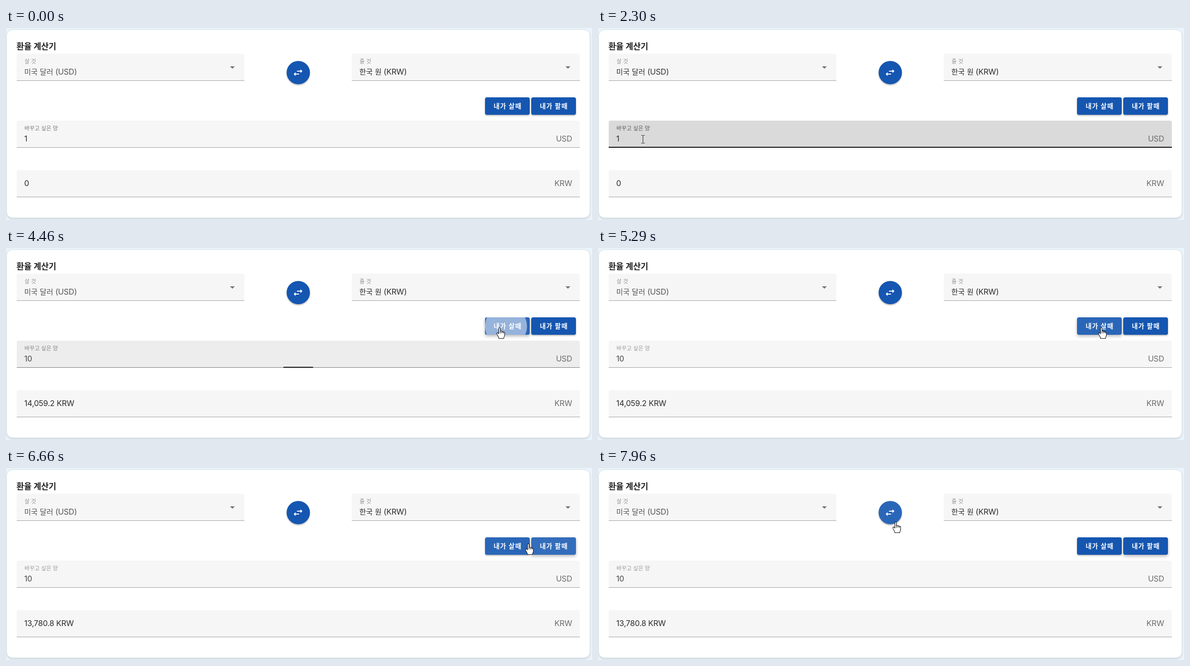
An HTML page with a canvas for the animation above (8 s loop, 1205 px wide and 396 px high).

```html
<!DOCTYPE html>
<html lang="ko">
<head>
<meta charset="utf-8">
<title>환율 계산기</title>
<style>
  html, body { margin: 0; width: 100%; height: 100%; overflow: hidden; background: #eaf4fa; }
  canvas { display: block; }
</style>
</head>
<body>
<canvas id="stage" width="1205" height="396"></canvas>
<script>
const ctx = document.getElementById('stage').getContext('2d');
const LOOP = 8000;
const BLUE = '#1556b1', BLUE_HOVER = '#2a66b8';
const FOCUS_AT = 1720, TYPE_AT = 2630;

// Bursts of screen updates: start, end, number of steps.
const BURSTS = [
  [730, 1470, 12], [1670, 2100, 7], [2300, 2420, 2], [2630, 2630, 1],
  [3160, 3930, 11], [3990, 4740, 11], [4880, 4950, 2], [5220, 5850, 10],
  [6310, 7070, 12], [7140, 7890, 12], [7960, 7960, 1]
];

// Pointer way: time, x, y.
const WAY = [
  [680, 121, 396], [730, 117, 376], [930, 72, 296], [1130, 68, 256], [1470, 76, 209],
  [1670, 78, 212], [1960, 92, 229], [3090, 92, 229], [3400, 434, 178], [3600, 760, 142],
  [3720, 900, 131], [3930, 998, 161], [4300, 1015, 164], [5160, 1015, 164],
  [5500, 1068, 165], [5850, 1126, 156], [6540, 1126, 156], [6800, 1010, 156],
  [7070, 888.5, 154], [7140, 880, 153], [7500, 720, 134], [7890, 612, 111], [8000, 612, 111]
];

const BUTTONS = [
  { x: 985, label: '내가 살때', down: 4332, px: 1015, py: 164 },
  { x: 1080, label: '내가 팔때', down: 6265, px: 1125, py: 157 }
];

const SWAP = new Path2D('M21,9L17,5V8H10V10H17V13M7,11L3,15L7,19V16H14V14H7V11Z');
const ARROW = new Path2D('M.5,.5V16.3L4,13L6.6,18.6L9,17.6L6.5,12.1H11.3Z');
const HAND = new Path2D('M-1.6,13V1.8C-1.6,-.2 1.5,-.2 1.5,1.8V8C2.2,6.8 4.5,7 4.7,8.8' +
  'C5.5,7.7 7.6,8 7.8,9.8C8.9,8.8 10.4,9.6 10.4,11.2V15.5C10.4,18 8.6,19 8.6,22.5' +
  'H-1.6C-1.6,19.5 -4,17 -5.6,13.4C-6.4,11.2 -4.2,9.8 -2.9,11.4Z');
const KNUCKLES = new Path2D('M1.5,8V12M4.7,9V12M7.8,10V12');

const clamp = v => Math.max(0, Math.min(1, v));
const mix = (a, b, p) => a + (b - a) * p;
const gray = v => { v = Math.round(v); return `rgb(${v},${v},${v})`; };

// cubic-bezier(.4, 0, .2, 1)
function ease(v) {
  v = clamp(v);
  let lo = 0, hi = 1;
  for (let i = 0; i < 20; i++) {
    const s = (lo + hi) / 2, r = 1 - s;
    if (1.2 * r * r * s + 0.6 * r * s * s + s * s * s < v) lo = s; else hi = s;
  }
  return lo * lo * (3 - 2 * lo);
}

function snap(t) {
  let held = 0;
  for (const [start, end, n] of BURSTS) {
    if (t < start) break;
    const step = n > 1 ? (end - start) / (n - 1) : 0;
    held = start + (n > 1 ? Math.min(n - 1, Math.floor((t - start) / step + 1e-6)) * step : 0);
  }
  return held;
}

function pointer(t) {
  const i = WAY.findIndex(p => p[0] > t);
  if (i < 1) return { x: -99, y: -99 };
  const [t0, x0, y0] = WAY[i - 1], [t1, x1, y1] = WAY[i];
  const p = (t - t0) / (t1 - t0);
  return { x: mix(x0, x1, p), y: mix(y0, y1, p) };
}

const inside = (p, x, y, w, h) => p.x >= x && p.x < x + w && p.y >= y && p.y < y + h;

// Hangul and Latin runs use different faces, so each run is set on its own.
function write(str, x, y, size, color, { weight = 400, track = 0, align = 0 } = {}) {
  const runs = str.match(/[가-힣]+|[^가-힣]+/g).map(s => {
    const hangul = /[가-힣]/.test(s);
    const font = hangul
      ? `${weight} ${size * 0.94}px "Noto Sans CJK KR", "Noto Sans CJK", sans-serif`
      : `${weight} ${size}px Inter, sans-serif`;
    const space = (hangul ? track : track - 0.2) + 'px';
    ctx.font = font;
    ctx.letterSpacing = space;
    return { s, font, space, w: ctx.measureText(s).width };
  });
  x -= align * (runs.reduce((sum, r) => sum + r.w, 0) - track);
  ctx.fillStyle = color;
  for (const r of runs) {
    ctx.font = r.font;
    ctx.letterSpacing = r.space;
    ctx.fillText(r.s, x, y);
    x += r.w;
  }
}

function box(x, y, w, h, r) {
  ctx.beginPath();
  ctx.roundRect(x, y, w, h, r);
}

function circle(x, y, r) {
  ctx.beginPath();
  ctx.arc(x, y, r, 0, 2 * Math.PI);
}

// Fills the current path with a drop shadow below it.
function raise(color, lift) {
  ctx.save();
  ctx.fillStyle = color;
  ctx.shadowColor = 'rgba(0,0,0,.28)';
  ctx.shadowOffsetY = mix(2, 3, lift);
  ctx.shadowBlur = mix(3, 6, lift);
  ctx.fill();
  ctx.restore();
}

function field(x, y, w, bg = 246, line = 160) {
  box(x, y, w, 56, [4, 4, 0, 0]);
  ctx.fillStyle = gray(bg);
  ctx.fill();
  ctx.fillStyle = gray(line);
  ctx.fillRect(x, y + 55, w, 1);
}

function select(x, w, label, value, color) {
  field(x, 53, w);
  write(label, x + 16, 73, 12, '#929292');
  write(value, x + 15.5, 96, 16, color);
  const cx = x + w - 24.5;
  ctx.beginPath();
  ctx.moveTo(cx - 5, 79);
  ctx.lineTo(cx + 5, 79);
  ctx.lineTo(cx, 84);
  ctx.fillStyle = '#757575';
  ctx.fill();
}

function button(b, t, mouse) {
  const { x, label, down, px, py } = b, y = 143, w = 92, h = 36;
  const other = BUTTONS.find(o => o !== b);
  const active = t >= down && !(other.down > down && t >= other.down + 120);
  const age = t - down;
  box(x, y, w, h, 4);
  raise(inside(mouse, x, y, w, h) ? BLUE_HOVER : BLUE, active ? ease(age / 100) : 0);
  if (age > 0 && age < 550) {
    const p = ease(age / 200);
    ctx.save();
    ctx.clip();
    ctx.globalAlpha = 0.5 * clamp(age / 100) * (1 - ease((age - 250) / 300));
    ctx.fillStyle = '#fff';
    circle(mix(px, x + w / 2, p), mix(py, y + h / 2, p), Math.hypot(w, h) / 2 * mix(0.3, 1, p));
    ctx.fill();
    ctx.restore();
  }
  write(label, x + w / 2, 166, 14, '#fff', { weight: 700, track: 1.25, align: 0.5 });
}

function swapButton(mouse, t) {
  const hover = t >= 7950 && Math.hypot(mouse.x - 601, mouse.y - 92) < 24;
  circle(601, 92, 24);
  raise(hover ? BLUE_HOVER : BLUE, 0);
  ctx.save();
  ctx.translate(588.5, 80);
  ctx.fillStyle = '#fff';
  ctx.fill(SWAP);
  ctx.restore();
}

function amountField(t, mouse) {
  const blurAt = BUTTONS[0].down, blurred = t >= blurAt;
  const amount = span => ease((t - FOCUS_AT) / span) - ease((t - blurAt) / span);
  const focus = amount(250);
  const hover = inside(mouse, 22, 191, 1158, 56);
  field(22, 191, 1158, mix(246, 218, focus), hover ? 50 : mix(160, 50, focus));
  const w = 1158 * amount(150);
  ctx.fillStyle = '#111';
  ctx.fillRect(601 - w / 2, 245, w, 2);

  write('바꾸고 싶은 양', 38, 211, 12, gray(mix(blurred ? 152 : 118, 88, focus)));
  const typed = t >= TYPE_AT;
  write(typed ? '10' : '1', 37.5, 234, 16, blurred ? '#484848' : '#2b2b2b');
  write('USD', 1164, 234, 16, '#6c6c6c', { align: 1 });

  const caret = (t >= 1760 && t < 2290) || (t >= 2420 && t < 3160) || (t >= 3690 && !blurred);
  if (caret) {
    ctx.fillStyle = '#111';
    ctx.fillRect(typed ? 54 : 45, 220, 1, 18);
  }
}

function resultField(t, mouse) {
  field(22, 293, 1158, 246, inside(mouse, 22, 293, 1158, 56) ? 50 : 160);
  const value = t < 4400 ? '0' : t < 6440 ? '14,059.2 KRW' : '13,780.8 KRW';
  write(value, 37.5, 326, 16, '#2b2b2b');
  write('KRW', 1164, 326, 16, '#6c6c6c', { align: 1 });
}

function shape(path) {
  ctx.fillStyle = '#fff';
  ctx.strokeStyle = '#111';
  ctx.lineWidth = 1.1;
  ctx.lineJoin = 'round';
  ctx.fill(path);
  ctx.stroke(path);
}

function drawPointer(mouse, t) {
  if (t < 730 || (t >= 2420 && t < 3160)) return;
  const pressed = [FOCUS_AT, ...BUTTONS.map(b => b.down)].some(d => t >= d && t < d + 90);
  if (pressed) {
    circle(mouse.x - 1, mouse.y, 12);
    ctx.fillStyle = 'rgba(255,255,0,.55)';
    ctx.fill();
  }
  ctx.save();
  ctx.translate(Math.round(mouse.x), Math.round(mouse.y));
  const onField = [191, 293].some(y => inside(mouse, 22, y, 1158, 56));
  const onButton = BUTTONS.some(b => inside(mouse, b.x, 143, 92, 36));
  if (onField) {
    ctx.fillStyle = '#222';
    ctx.fillRect(0, -7, 1, 15);
    for (const y of [-8, 8]) {
      ctx.fillRect(-3, y, 3, 1);
      ctx.fillRect(1, y, 3, 1);
    }
  } else if (onButton || Math.hypot(mouse.x - 601, mouse.y - 92) < 24) {
    shape(HAND);
    ctx.stroke(KNUCKLES);
  } else {
    shape(ARROW);
  }
  ctx.restore();
}

function draw(t) {
  const mouse = pointer(t);
  ctx.fillStyle = '#eaf4fa';
  ctx.fillRect(0, 0, 1205, 396);

  ctx.save();
  ctx.shadowColor = 'rgba(0,0,0,.16)';
  ctx.shadowOffsetY = 2;
  ctx.shadowBlur = 4;
  box(1.5, 3.5, 1199, 388, 12);
  ctx.fillStyle = '#fff';
  ctx.fill();
  ctx.restore();
  ctx.strokeStyle = '#dce5eb';
  ctx.lineWidth = 1;
  ctx.stroke();

  write('환율 계산기', 21.5, 44, 18, '#222', { weight: 700 });
  select(22, 468, '살 것', '미국 달러 (USD)', t >= 1670 && t < 3160 ? '#333' : '#555');
  select(711, 469, '줄 것', '한국 원 (KRW)', '#2b2b2b');
  swapButton(mouse, t);
  BUTTONS.forEach(b => button(b, t, mouse));
  amountField(t, mouse);
  resultField(t, mouse);
  drawPointer(mouse, t);
}

const begin = performance.now();
function tick() {
  draw(snap((performance.now() - begin) % LOOP));
  requestAnimationFrame(tick);
}
tick();
</script>
</body>
</html>
```
